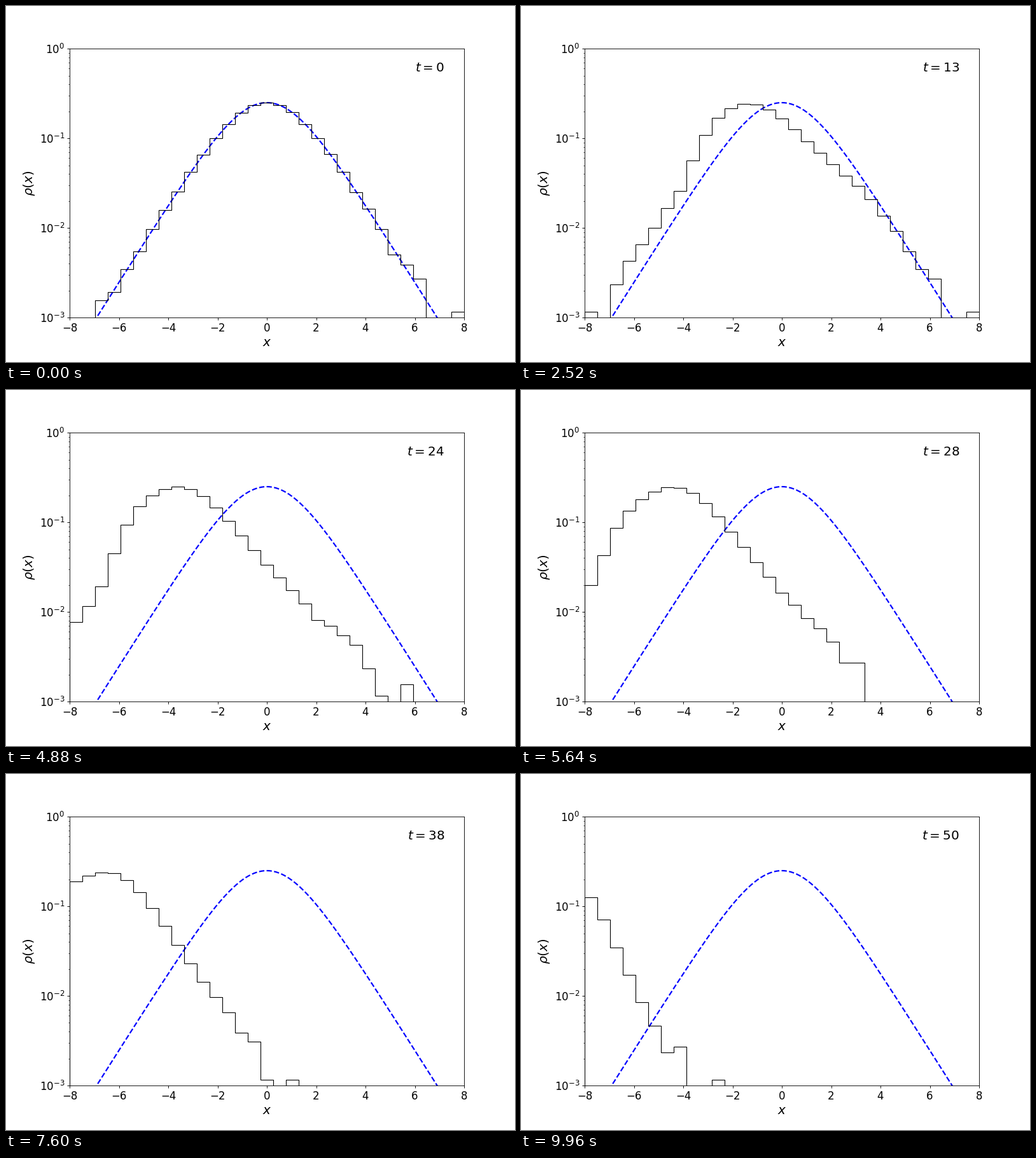
These frames come from a looping animation (800 px wide and 560 px high, 10000 ms). A matplotlib script:

```python
import numpy as np
import matplotlib.pyplot as plt
from matplotlib.animation import FuncAnimation

FRAMES = 250
INTERVAL = 40
T_END = 50
BINS = 31
PARTICLES = 5000
FLOOR = 1e-5  # stands for an empty bin on the log axis

plt.rcParams.update({"font.family": "DejaVu Sans", "font.size": 15})

edges = np.linspace(-8, 8, BINS + 1)
width = edges[1] - edges[0]


def curve(values):
    """Smooth polynomial over the start position, flat outside the knots."""
    knots = np.linspace(-4, 6, len(values))
    fit = np.polyfit(knots, values, len(values) - 1)
    return np.polyval(fit, np.clip(start, knots[0], knots[-1]))


# Logistic start positions, with a little seeded scatter in the ranks
rng = np.random.default_rng(4)
ranks = np.arange(PARTICLES) + 0.5 + rng.uniform(-2, 2, PARTICLES)
u = np.clip(ranks, 0.5, PARTICLES - 0.5) / PARTICLES
start = np.log(u / (1 - u))

# Each particle rests, then eases into a steady drift to the left
onset = curve([14.5, 12.5, 10, 12, 17, 18.5])
ease = curve([5, 5, 5, 3, 2, 1.5])
speed = curve([0.27, 0.27, 0.245, 0.26, 0.315, 0.33])


def softplus(t):
    return ease * np.logaddexp(0, (t - onset) / ease)


def density(t):
    x = start - speed * (softplus(t) - softplus(0))
    counts, _ = np.histogram(x, edges)
    return np.maximum(counts / (PARTICLES * width), FLOOR)


fig, ax = plt.subplots(figsize=(10, 7), dpi=80)
fig.subplots_adjust(left=0.125, right=0.9, bottom=0.125, top=0.88)
ax.set_yscale("log")

x = np.linspace(-8, 8, 200)
ax.plot(x, 0.25 / np.cosh(x / 2) ** 2, "b--", linewidth=2)
bars = ax.stairs(density(0), edges, baseline=FLOOR, color="k",
                 linewidth=1, zorder=2.1)

ax.set_xlim(-8, 8)
ax.set_ylim(1e-3, 1)
ax.set_xticks(range(-8, 9, 2))
ax.set_xlabel(r"$x$", fontsize=18)
ax.set_ylabel(r"$\rho(x)$", fontsize=18)
clock = ax.text(0.95, 0.95, "", transform=ax.transAxes, fontsize=18,
                ha="right", va="top")


def update(step):
    t = T_END * step / (FRAMES - 1)
    bars.set_data(values=density(t))
    clock.set_text(f"$t = {t:.0f}$")
    return bars, clock


anim = FuncAnimation(fig, update, frames=FRAMES, interval=INTERVAL,
                     repeat=True, repeat_delay=0)
plt.show()
```
